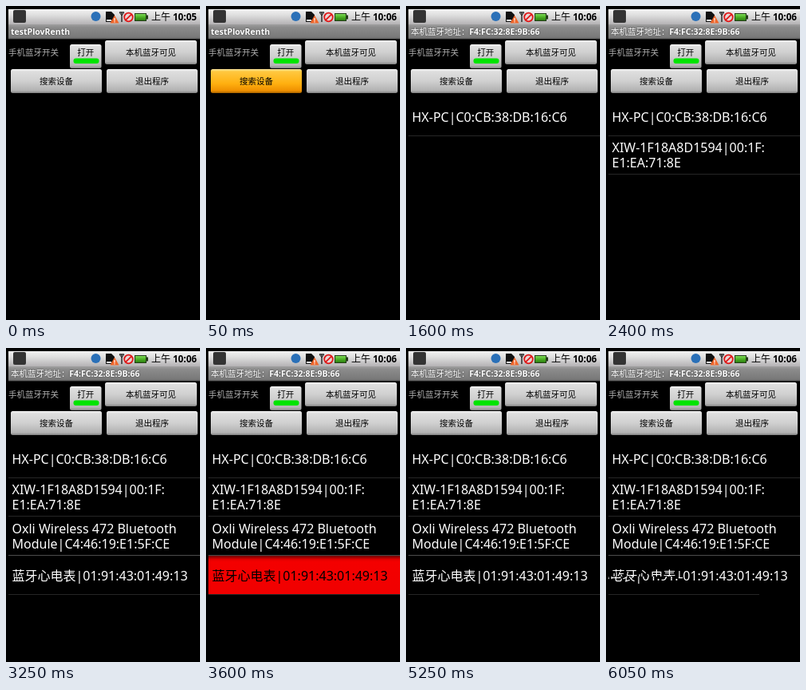
An HTML page with a canvas that plays this animation: 243 by 393 pixels, repeating every 8000 ms.

```html
<!DOCTYPE html>
<html lang="zh-CN">
<head>
<meta charset="utf-8">
<title>Device search</title>
<style>
  html, body { margin: 0; width: 100%; height: 100%; overflow: hidden; background: #000; }
  canvas { display: block; width: 243px; height: 393px; }
</style>
</head>
<body>
<canvas id="stage"></canvas>
<script>
const W = 243, H = 393, LOOP = 8000;
const SANS = '"Noto Sans", "Noto Sans CJK SC", "Noto Sans CJK", sans-serif';
const HAN = '"Noto Sans CJK SC", "Noto Sans CJK", sans-serif';

// Moments at which the screen changes, in ms
const AT = { press: 50, first: 1600, second: 2400, rest: 3250, select: 3600, release: 5250, tear: 6050 };

const ROWS = [
  { from: AT.first, y: 145, line: 162, text: ['HX-PC|C0:CB:38:DB:16:C6'] },
  { from: AT.second, y: 183, line: 210, text: ['XIW-1F18A8D1594|00:1F:', 'E1:EA:71:8E'] },
  { from: AT.rest, y: 232, line: 259, text: ['Oxli Wireless 472 Bluetooth', 'Module|C4:46:19:E1:5F:CE'] },
];
const LAST = { y: 290.5, line: 308, text: '蓝牙心电表|01:91:43:01:49:13' };

const canvas = document.getElementById('stage');
const ctx = canvas.getContext('2d');
const scale = window.devicePixelRatio || 1;
canvas.width = W * scale;
canvas.height = H * scale;

function rect(x, y, w, h, fill) {
  ctx.fillStyle = fill;
  ctx.fillRect(x, y, w, h);
}

function rounded(x, y, w, h, r, fill) {
  ctx.beginPath();
  ctx.roundRect(x, y, w, h, r);
  ctx.fillStyle = fill;
  ctx.fill();
}

function shape(points, fill) {
  ctx.beginPath();
  points.forEach(([x, y]) => ctx.lineTo(x, y));
  ctx.closePath();
  ctx.fillStyle = fill;
  ctx.fill();
}

function stroke(points, color, width) {
  ctx.beginPath();
  points.forEach(([x, y], i) => i ? ctx.lineTo(x, y) : ctx.moveTo(x, y));
  ctx.strokeStyle = color;
  ctx.lineWidth = width;
  ctx.stroke();
}

function circle(x, y, r) {
  ctx.beginPath();
  ctx.arc(x, y, r, 0, Math.PI * 2);
}

function vertical(y, h, stops) {
  const g = ctx.createLinearGradient(0, y, 0, y + h);
  stops.forEach(([at, color]) => g.addColorStop(at, color));
  return g;
}

function label(text, x, y, size, color, { weight = 400, family = SANS, align = 'left' } = {}) {
  ctx.font = `${weight} ${size}px ${family}`;
  ctx.textAlign = align;
  ctx.fillStyle = color;
  ctx.fillText(text, x, y);
}

function drawStatus(t) {
  rect(3, 4, 240, 19, vertical(4, 19, [[0, '#f2f2f2'], [0.4, '#dedede'], [1, '#b4b2b4']]));
  rounded(9, 5, 16, 16, 2, '#333');

  circle(112.5, 13, 6);
  ctx.fillStyle = '#2a70b8';
  ctx.fill();

  // Memory card with a warning sign
  shape([[125, 7], [132, 7], [136, 11], [136, 20], [125, 20]], '#111');
  rect(126, 17, 6, 2, '#eee');
  shape([[136, 11.5], [141.5, 21.5], [130.5, 21.5]], '#f0662a');
  rect(135.4, 15, 1.2, 3.5, '#fff');
  rect(135.4, 19.3, 1.2, 1.2, '#fff');

  // Antenna without reception
  stroke([[142, 8], [148, 8]], '#222', 1.4);
  stroke([[142, 8], [145, 12], [148, 8]], '#222', 1);
  stroke([[145, 8], [145, 20]], '#222', 1.4);
  circle(153.5, 14, 5.3);
  ctx.fillStyle = '#e8d4d4';
  ctx.fill();
  ctx.strokeStyle = '#e01818';
  ctx.lineWidth = 1.8;
  ctx.stroke();
  stroke([[149.8, 17.7], [157.2, 10.3]], '#e01818', 1.8);

  // Battery
  rect(161, 9, 15, 10, '#243c18');
  rect(176, 11.5, 2, 5, '#243c18');
  rect(162, 10, 13, 8, vertical(10, 8, [[0, '#7cd858'], [0.45, '#50b428'], [1, '#2c8010']]));

  label('上午', 182, 18, 12, '#000', { family: HAN });
  label(t < AT.press ? '10:05' : '10:06', 239, 18, 11.7, '#000', { weight: 700, align: 'right' });
}

function drawTitle(t) {
  rect(3, 23, 240, 18, vertical(23, 18, [[0, '#a0a0a0'], [0.2, '#8c8c8c'], [0.9, '#787878'], [1, '#5c5c5c']]));
  rect(3, 41, 240, 1, '#242424');
  ctx.shadowColor = '#333';
  ctx.shadowBlur = 2 * scale;
  if (t < AT.first) {
    label('testPlovRenth', 6, 35.5, 10.5, '#fff', { weight: 700 });
  } else {
    label('本机蓝牙地址：', 6, 35.5, 10.5, '#fff', { family: HAN });
    label('F4:FC:32:8E:9B:66', 79.3, 35.5, 10.5, '#fff', { weight: 700 });
  }
  ctx.shadowColor = 'transparent';
  ctx.shadowBlur = 0;
}

function drawButton(x, y, w, text, pressed, textY = y + 19) {
  const stops = pressed
    ? [[0, '#ffe8a0'], [0.1, '#ffc840'], [0.6, '#ffb010'], [0.9, '#f09000'], [1, '#a86400']]
    : [[0, '#f4f4f4'], [0.1, '#dedede'], [0.5, '#d0d0d0'], [0.9, '#b2b2b2'], [1, '#808080']];
  rounded(x, y, w, 30, 2.5, vertical(y, 30, stops));
  label(text, x + w / 2, textY, 10.5, '#000', { family: HAN, align: 'center' });
}

function drawControls(t) {
  label('手机蓝牙开关', 3, 62, 10.5, '#b0b0b0', { family: HAN });
  drawButton(80, 48, 39.5, '打开', false, 62);
  rounded(84.5, 65.5, 32, 6.5, 3, '#00e400');
  drawButton(124, 43, 115, '本机蓝牙可见', false, 62);
  drawButton(6, 79, 114, '搜索设备', t >= AT.press && t < AT.first);
  drawButton(126, 79, 114, '退出程序', false);
}

function drawLast(t) {
  const selected = t >= AT.select && t < AT.release;
  const torn = t >= AT.tear;
  if (selected) {
    rect(3, 260, 240, 48, vertical(260, 48, [[0, '#700000'], [0.1, '#e40000'], [0.16, '#f40000'], [1, '#f00000']]));
  }
  rect(3, LAST.line, torn ? 189 : 240, 1, '#262626');
  label(LAST.text, 7.5, LAST.y, 16, selected ? '#000' : '#fff');
  if (!torn) return;

  // Lower part of the line slips sideways
  ctx.save();
  ctx.beginPath();
  ctx.rect(3, 286, 93, 9);
  ctx.clip();
  rect(3, 286, 93, 9, '#000');
  label(LAST.text, 7.5 - 51, LAST.y, 16, '#fff');
  ctx.restore();
}

function drawList(t) {
  for (const row of ROWS) {
    if (t < row.from) continue;
    row.text.forEach((text, i) => label(text, 7.5, row.y + i * 19, 16, '#fff'));
    rect(3, row.line, 240, 1, row.line === 259 ? '#4c4c4c' : '#262626');
  }
  if (t >= AT.rest) drawLast(t);
}

function draw(t) {
  ctx.setTransform(scale, 0, 0, scale, 0, 0);
  rect(0, 0, W, H, '#000');
  drawStatus(t);
  drawTitle(t);
  drawControls(t);
  drawList(t);
}

const start = performance.now();
function tick() {
  draw((performance.now() - start) % LOOP);
  requestAnimationFrame(tick);
}
tick();
</script>
</body>
</html>
```
